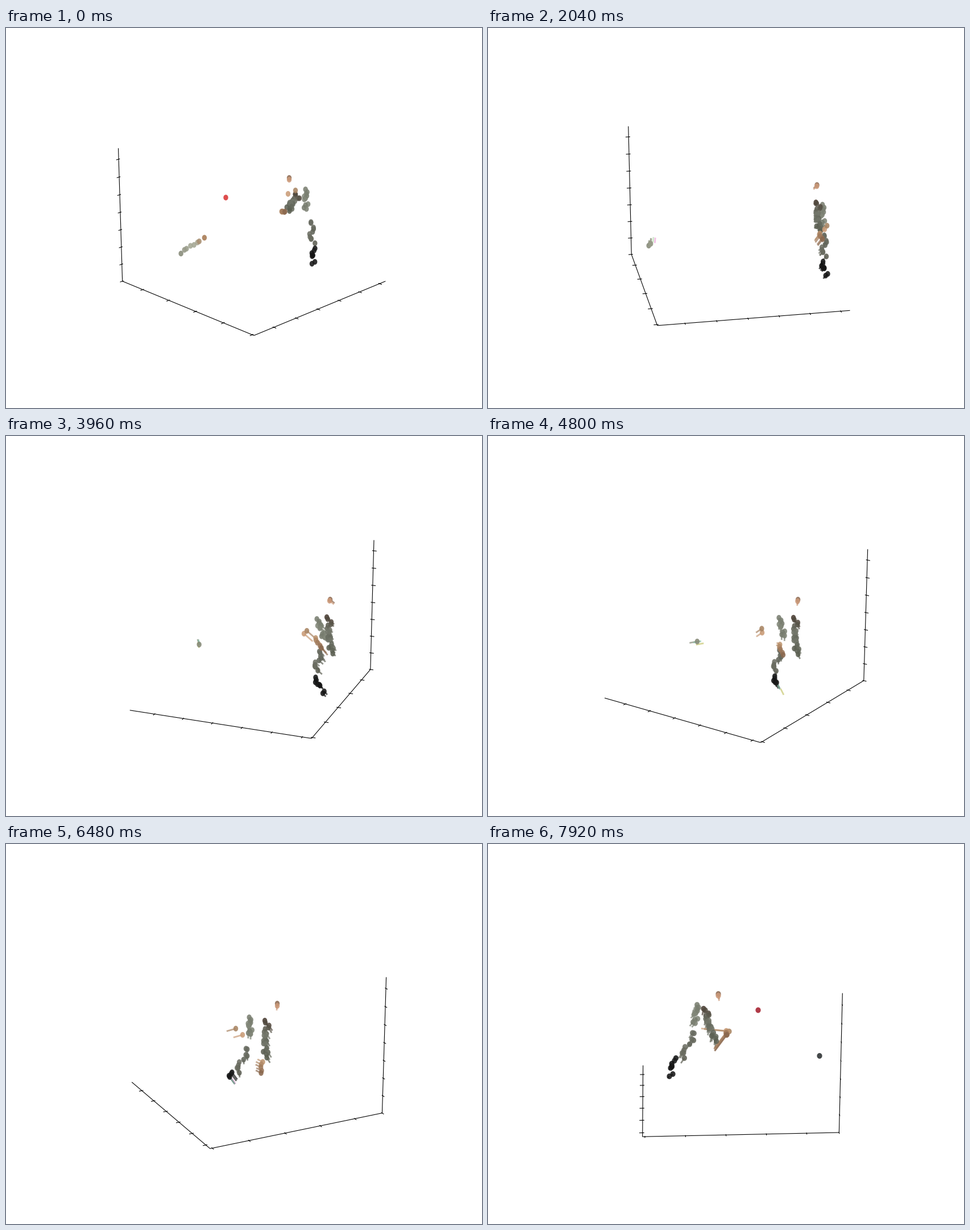
Recreate the animation shown at these times as a matplotlib script. Size 837 by 669 pixels, loop 8000 ms.

```python
import numpy as np
import matplotlib.pyplot as plt
from matplotlib.animation import FuncAnimation
from matplotlib.collections import LineCollection, PolyCollection

W, H, DPI = 837, 669, 64
PX = 72 / DPI
STEP_MS, TICK_MS, LOOP_MS = 120, 40, 8000
KEYS = (0, 9, 33, 54, 66)
rng = np.random.default_rng(4)

# camera: circles the box by two degrees a step
CX, CY, FOCAL, DIST = 436, 330.5, 2790, 10
ELEV = np.radians(20)
CE, SE = np.cos(ELEV), np.sin(ELEV)
HALF = np.array([0.5952, 0.5952, 0.4464])


def azimuth(step):
    return np.radians(45 + 2 * step)


def view(step):
    """Unit vectors to the right, up and towards the eye."""
    c, s = np.cos(azimuth(step)), np.sin(azimuth(step))
    return (np.array([-s, c, 0]), np.array([-c * SE, -s * SE, CE]),
            np.array([c * CE, s * CE, SE]))


def project(p, step):
    right, up, eye = view(step)
    k = FOCAL / (DIST - p @ eye)
    return np.stack([CX + k * (p @ right), CY - k * (p @ up)], -1)


def lift(xy, wall, step):
    """Where the sight line through xy meets the plane x = wall."""
    right, up, eye = view(step)
    ray = (xy[0] - CX) / FOCAL * right + (CY - xy[1]) / FOCAL * up - eye
    return DIST * eye + ray * (wall - DIST * eye[0]) / ray[0]


def between(keys, rows, at):
    return np.stack([np.interp(at, keys, col) for col in np.transpose(rows)], -1)


class Strand:
    """Dots scattered along a segment that drifts through space.

    Each pose is the segment's two ends on screen: x0, y0, x1, y1.
    """

    def __init__(self, n, poses, colors, jitter=0, wall=-0.545, keys=KEYS,
                 alive=None, memory=6, fade_to=None):
        ends = np.array(poses, float)
        a, b = ends[:, :2], ends[:, 2:]
        self.n, self.keys, self.memory = n, keys, memory
        self.centers = [lift(m, wall, k) for m, k in zip((a + b) / 2, keys)]
        self.halves = (b - a) / 2
        self.along = np.linspace(-1, 1, n)[:, None]
        self.jitter = rng.uniform(-jitter, jitter, (n, 2))
        tone = between(np.linspace(0, 1, len(colors)), colors, np.linspace(0, 1, n))
        self.rgb = (tone + rng.uniform(-1, 1, (n, 1)) * 2 * jitter) / 255
        self.last_rgb = self.rgb if fade_to is None else np.array([fade_to]) / 255
        self.alive = alive or ([0], [n])

    def at(self, step):
        past = np.maximum(step - np.arange(self.memory + 1), 0)
        path = project(between(self.keys, self.centers, past), step)
        offset = self.along * between(self.keys, self.halves, step) + self.jitter
        trails = path[None] + offset[:, None]
        f = min(step / 9, 1)
        rgb = self.rgb * (1 - f) + self.last_rgb * f
        return trails, rgb, int(np.interp(step, *self.alive) + 0.2)


strands = [
    # far group, thinning out
    Strand(8, [(305, 397, 346, 370), (274, 393, 300, 369),
               (337, 367, 344, 390), (399, 362, 480, 368)],
           [(128, 132, 114), (162, 165, 146), (160, 163, 144), (170, 125, 86)],
           jitter=3, wall=0.5, keys=(0, 9, 33, 46),
           alive=([0, 9, 33, 50, 51], [8, 4, 1, 1, 0])),
    # red dot with its long trail
    Strand(1, [(386.5, 298.5, 386.5, 298.5), (304, 362.5, 304, 362.5)], [(218, 52, 52)],
           wall=0.44, keys=(0, 9), alive=([10, 12], [1, 0]), memory=9,
           fade_to=(152, 86, 76)),
    # late dots
    Strand(2, [(475, 292.5, 583, 373)], [(165, 32, 46), (42, 46, 48)],
           wall=0, keys=(66,), alive=([63, 64], [0, 2])),
    # grey arms
    Strand(11, [(526, 286, 528, 316), (563, 308, 558, 345), (546, 324, 560, 352),
                (427, 307, 430, 332), (367, 285, 364, 313)],
           [(126, 131, 117), (120, 125, 111)], jitter=4),
    Strand(20, [(513, 294, 496, 322), (553, 304, 553, 347), (568, 320, 572, 383),
                (459, 312, 456, 376), (383, 291, 399, 347)],
           [(76, 63, 53), (102, 104, 92), (112, 116, 104), (102, 106, 94), (90, 94, 80)],
           jitter=5),
    Strand(10, [(536, 342, 540, 374), (568, 358, 572, 392), (552, 380, 545, 408),
                (424, 360, 407, 398), (362, 332, 342, 372)],
           [(98, 101, 90), (102, 104, 92)], jitter=5),
    # brown pair and clump
    Strand(2, [(496, 292, 509, 286), (558, 357, 562, 350), (524, 348, 529, 343),
               (416, 336, 404, 325), (419, 329, 424, 330)],
           [(202, 156, 120), (168, 132, 98)]),
    Strand(5, [(484, 324, 490, 322), (548, 366, 551, 371), (543, 356, 554, 372),
               (450, 384, 448, 402), (420, 331, 419, 335)],
           [(186, 145, 108), (142, 108, 82)], jitter=2),
    # black foot
    Strand(8, [(542, 384, 541, 414), (574, 400, 579, 426), (543, 421, 560, 452),
               (396, 398, 396, 420), (329, 373, 322, 408)],
           [(22, 23, 23), (18, 18, 18)], jitter=4,
           alive=([33, 46, 54, 66], [8, 3, 4, 8])),
    # peach pair on top
    Strand(2, [(498, 264, 498, 267), (541, 273, 541, 275), (570, 288, 569, 290),
               (477, 281, 477, 285), (405, 264, 405, 267)],
           [(140, 106, 82), (204, 154, 122)]),
]
PASTEL = np.array([(240, 165, 220), (130, 190, 165), (200, 200, 115), (190, 225, 185)]) / 255

# ticks: axis, fraction of the first, spacing, count
TICKS = [(0, 0.049, 0.162, 6), (1, 0.988, -0.2055, 5), (2, 0, 0.1314, 8)]


def box_lines(step):
    az = azimuth(step)
    near = np.array([np.sign(np.cos(az)), np.sign(np.sin(az)), -1])
    lines = []
    for axis, first, gap, count in TICKS:
        across = 1 if axis == 0 else 0
        edge = near * HALF
        if axis == 2:
            edge[1] *= -1
        ends = np.array([edge, edge])
        ends[:, axis] = -HALF[axis], HALF[axis]
        lines.append(project(ends, step))
        for f in first + gap * np.arange(count):
            tick = np.array([edge, edge])
            tick[:, axis] = (2 * f - 1) * HALF[axis]
            tick[:, across] += near[across] * HALF[across] / 6 * np.array([0.2, -0.1])
            lines.append(project(tick, step))
    return lines


fig = plt.figure(figsize=(W / DPI, H / DPI), dpi=DPI, facecolor="white")
ax = fig.add_axes([0, 0, 1, 1])
ax.set(xlim=(0, W), ylim=(H, 0))
ax.axis("off")
box = LineCollection([], colors="black", linewidths=1.1 * PX, zorder=1)
trail_art = LineCollection([], linewidths=2.8 * PX, zorder=2)
dot_art = PolyCollection([], linewidths=0, zorder=3)
for art in (box, trail_art, dot_art):
    ax.add_collection(art, autolim=False)

angle = np.linspace(0, 2 * np.pi, 28, endpoint=False)
CIRCLE = np.stack([np.cos(angle), np.sin(angle)], -1)


def draw(i):
    step = i * TICK_MS // STEP_MS
    radius = np.array([np.interp(step, [54, 66], [4.2, 4.6]), 5])
    trails, trail_rgba, dots, dot_rgba = [], [], [], []
    for s in strands:
        paths, rgb, count = s.at(step)
        for j in range(s.n):
            if j < count:
                dots.append(paths[j, 0] + CIRCLE * radius)
                dot_rgba.append((*rgb[j], 0.88))
                trails.append(paths[j])
                trail_rgba.append((*rgb[j], 0.7))
            elif 0 < count and j < count + 2:
                # a dot that dropped out leaves a pale streak
                trails.append(paths[j])
                trail_rgba.append((*PASTEL[j % len(PASTEL)], 0.7))
    box.set_segments(box_lines(step))
    trail_art.set_segments(trails)
    trail_art.set_color(trail_rgba)
    dot_art.set_verts(dots)
    dot_art.set_facecolor(dot_rgba)
    return box, trail_art, dot_art


anim = FuncAnimation(fig, draw, frames=LOOP_MS // TICK_MS, interval=TICK_MS,
                     init_func=lambda: draw(0), repeat=True, repeat_delay=0)
plt.show()
```
